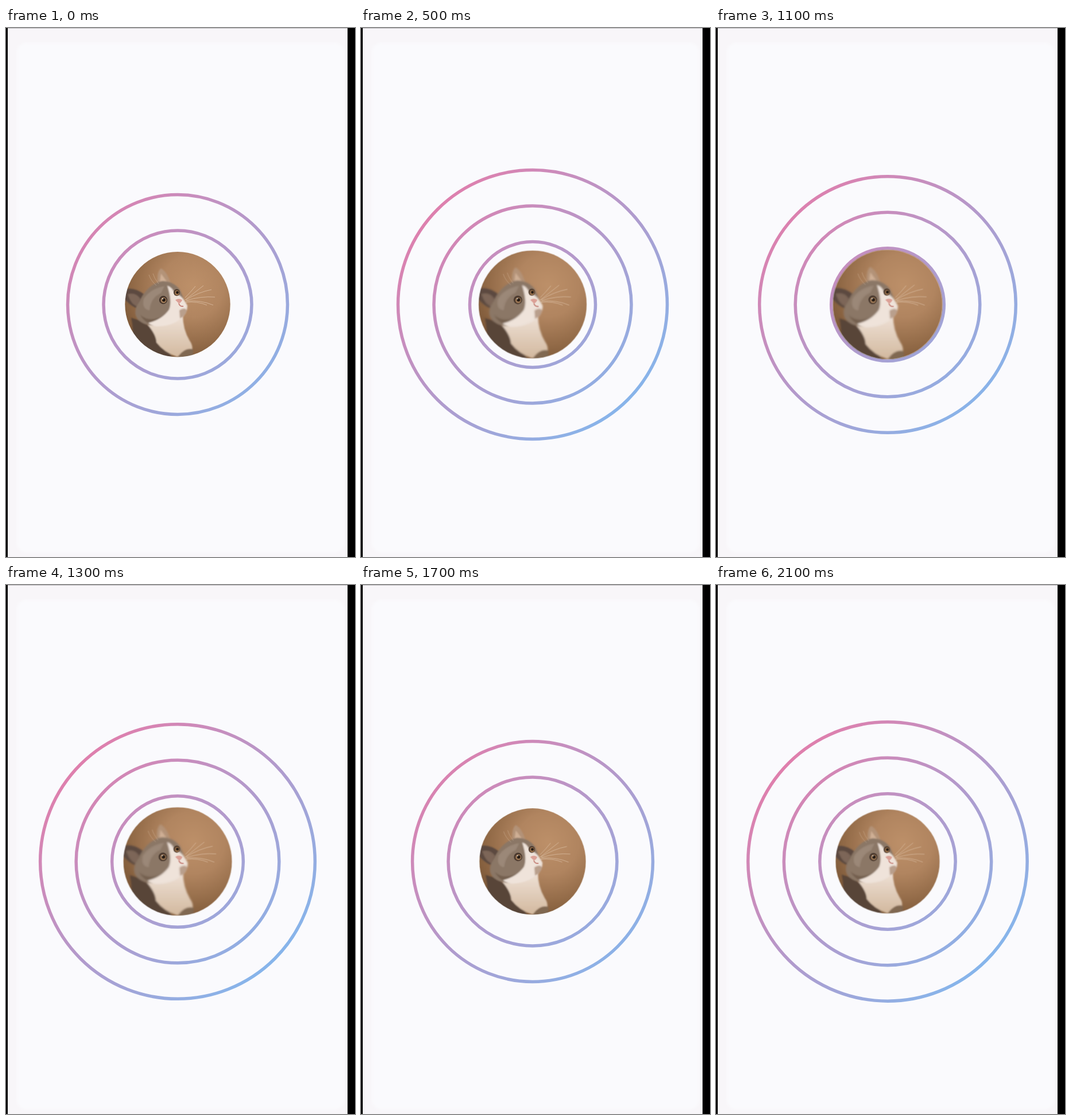
An HTML page that plays this animation: 608 by 922 pixels, repeating every 2200 ms.

```html
<!DOCTYPE html>
<html lang="en">
<head>
<meta charset="utf-8">
<title>Ripple avatar</title>
<style>
  @property --grow { syntax: "<number>"; inherits: true; initial-value: 129; }

  html, body { margin: 0; width: 100%; height: 100%; overflow: hidden; background: #000; }
  svg { position: absolute; left: 0; top: 0; width: 608px; height: 922px; }

  .rings {
    fill: none;
    stroke: url(#tint);
    stroke-width: 5.5;
    animation: grow 2200ms infinite;
  }
  /* rings sit 62.5px apart and vanish once they pass 250px */
  .rings circle {
    --r: calc(var(--grow) + 62.5 * var(--k));
    r: max(0px, calc(var(--r) * 1px));
    opacity: calc((250 - var(--r)) * 99);
  }
  .photo {
    transform-origin: 299px 482px;
    animation: breathe 2200ms infinite;
  }

  @keyframes grow {
    0%     { --grow: 129;   animation-timing-function: steps(5); }
    22.72% { --grow: 172;   animation-timing-function: steps(2); }
    31.81% { --grow: 188.4; animation-timing-function: steps(4); }
    50%    { --grow: 223.3; animation-timing-function: steps(4); }
    68.18% { --grow: 255.4; animation-timing-function: steps(4); }
    86.36% { --grow: 288.5; animation-timing-function: steps(2); }
    95.45% { --grow: 305.7; animation-timing-function: steps(1); }
    100%   { --grow: 316.5; }
  }
  @keyframes breathe {
    0%     { transform: scale(1);     animation-timing-function: steps(7); }
    31.81% { transform: scale(1.038); animation-timing-function: steps(2); }
    40.9%  { transform: scale(1.046); animation-timing-function: steps(2); }
    50%    { transform: scale(1.042); animation-timing-function: steps(4); }
    68.18% { transform: scale(1.021); animation-timing-function: steps(4); }
    86.36% { transform: scale(1);     animation-timing-function: steps(2); }
    95.45% { transform: scale(.989);  animation-timing-function: steps(1); }
    100%   { transform: scale(1); }
  }
</style>
</head>
<body>
<svg viewBox="0 0 608 922">
  <defs>
    <linearGradient id="tint" gradientUnits="userSpaceOnUse" x1="49" y1="232" x2="549" y2="732">
      <stop stop-color="#f3739f"/>
      <stop offset="1" stop-color="#72c1f9"/>
    </linearGradient>
    <radialGradient id="wall" gradientUnits="userSpaceOnUse" cx="325" cy="450" r="135">
      <stop stop-color="#bd9069"/>
      <stop offset=".4" stop-color="#b18560"/>
      <stop offset=".75" stop-color="#936b48"/>
      <stop offset="1" stop-color="#7b5737"/>
    </radialGradient>
    <linearGradient id="chest" x1="0" y1="0" x2="0" y2="1">
      <stop stop-color="#f0e4da"/>
      <stop offset="1" stop-color="#d3b99f"/>
    </linearGradient>
    <clipPath id="disc"><circle cx="299" cy="481.8" r="91.7"/></clipPath>
    <filter id="soft"><feGaussianBlur stdDeviation="1.3"/></filter>
    <filter id="edge" x="-5%" y="-5%" width="110%" height="110%"><feGaussianBlur stdDeviation="2"/></filter>
  </defs>

  <rect x="3" width="592" height="922" fill="#f8f6f9"/>
  <rect x="19" y="26" width="570" height="888" rx="16" fill="#fafafd" filter="url(#edge)"/>
  <rect x="3" width="592" height="1" fill="#bdbbbe"/>

  <g class="rings">
    <circle cx="299" cy="482" style="--k:1"/>
    <circle cx="299" cy="482" style="--k:0"/>
    <circle cx="299" cy="482" style="--k:-1"/>
    <circle cx="299" cy="482" style="--k:-2"/>
    <circle cx="299" cy="482" style="--k:-3"/>
  </g>

  <g class="photo">
    <g clip-path="url(#disc)">
      <rect x="205" y="388" width="188" height="188" fill="url(#wall)"/>
      <g filter="url(#soft)">
        <!-- body and chest -->
        <path d="M218 505Q240 510 262 530L292 578H205Q228 550 218 505Z" fill="#584437"/>
        <path d="M246 516Q262 535 262 548Q276 566 298 573L322 568Q328 556 320 545Q308 525 308 500L280 496Z" fill="url(#chest)"/>
        <path d="M300 572Q312 556 326 560V576H300Z" fill="#806751"/>
        <!-- ears -->
        <path d="M264 443Q263 424 270 419Q281 425 287 446Z" fill="#b39378"/>
        <path d="M268 442L270 428L281 443Z" fill="#d0b096"/>
        <path d="M206 456Q222 450 242 465L238 489Q224 492 206 472Z" fill="#5c4a40"/>
        <path d="M212 464Q226 460 234 472L228 485Q218 482 212 464Z" fill="#7d6658"/>
        <!-- head -->
        <path d="M237 468Q250 446 272 441Q291 441 303 456Q309 470 313 482L302 508Q270 525 242 516Q220 507 227 486Z" fill="#8b7766"/>
        <path d="M240 472Q252 454 276 450L270 462Q252 470 250 492Q236 490 240 472Z" fill="#9b8878"/>
        <path d="M234 500Q252 516 280 498L272 515Q246 522 234 500Z" fill="#75604f"/>
        <path d="M281 449Q290 452 294 463Q306 464 316 484Q316 499 304 507Q288 520 262 520Q252 518 248 514Q272 508 284 491Q290 477 281 449Z" fill="#efe3da"/>
        <path d="M302 492Q312 486 315 492Q312 503 303 506Z" fill="#b99f8c"/>
      </g>
      <!-- face -->
      <circle cx="274" cy="474" r="7.2" fill="#45352b"/>
      <circle cx="274.5" cy="474.5" r="5" fill="#a27c58"/>
      <circle cx="275" cy="474" r="2.9" fill="#211812"/>
      <ellipse cx="297.5" cy="461" rx="5.5" ry="6" fill="#4e3b2e"/>
      <ellipse cx="298" cy="461.5" rx="3.7" ry="4.2" fill="#a27850"/>
      <circle cx="298.5" cy="461" r="2.4" fill="#211812"/>
      <circle cx="273" cy="472" r="1" fill="#eee"/>
      <path d="M295 474Q301 470 307 474Q305 479 301 480Z" fill="#dca096"/>
      <path d="M301 480Q303 486 309 485" fill="none" stroke="#c47f76" stroke-width="1.8"/>
      <g fill="none" stroke="#ead4be" stroke-width=".8" opacity=".7">
        <path d="M312 474Q330 460 344 449M313 474Q336 460 358 456M314 475Q340 467 364 469M314 476Q340 474 361 483M313 478Q334 476 350 483M312 470Q322 460 330 450"/>
        <path d="M262 449Q252 440 249 430M266 446Q258 436 256 428" opacity=".6"/>
      </g>
    </g>
  </g>
</svg>
</body>
</html>
```
